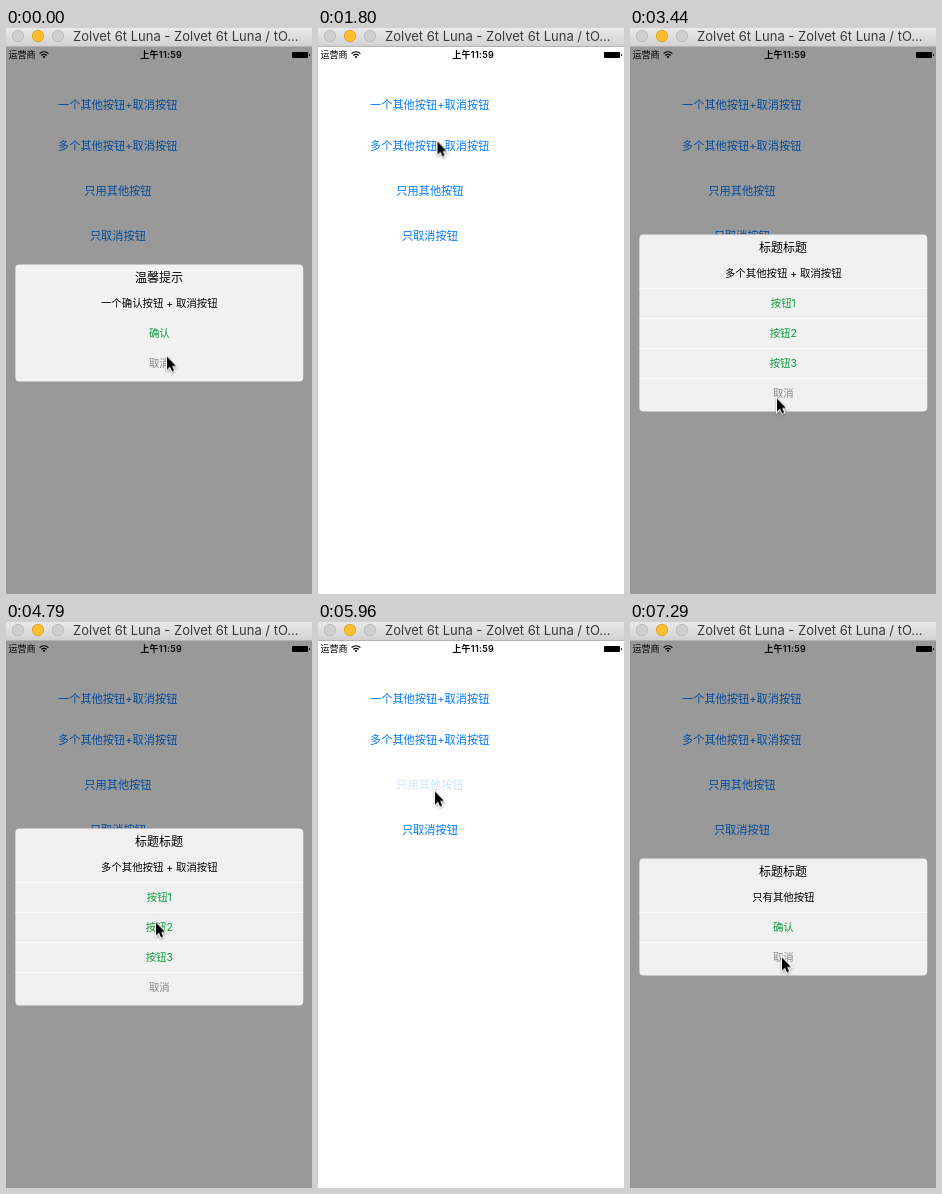
Recreate the animation shown at these times as an HTML page. Size 306x566 px, loop 8000 ms.

```html
<!DOCTYPE html>
<html lang="zh-CN">
<head>
<meta charset="utf-8">
<title>Alert demo</title>
<style>
html, body { margin: 0; width: 100%; height: 100%; overflow: hidden; background: #fff; }
svg { display: block; width: 306px; height: 566px; }
text { font-family: Inter, "Noto Sans CJK SC", "Noto Sans CJK", "Noto Sans CJK JP", sans-serif; text-anchor: middle; }

.window { font-size: 13px; fill: #3a3a3a; text-anchor: start; }
.carrier { font-size: 9px; text-anchor: start; }
.clock { font-size: 9px; font-weight: 600; letter-spacing: .3px; }
.link { font-size: 11.2px; fill: #007aff; }
.head { font-size: 12px; }
.dialog { font-size: 10.4px; }
.box { fill: #f0f0f0; }
.ok { fill: #0f9a40; }
.no { fill: #888; }
.lines { stroke: #fbfbfb; }

/* one 8 s cycle; every state change is a hard cut */
.cut { animation: 8s step-end infinite; }
.dim { animation-name: dim; }
.first { animation-name: first; }
.second { animation-name: second; }
.third { animation-name: third; }
.second .lines { animation-name: lines2; }
.third .lines { animation-name: lines3; }
.press2 { animation-name: press2; }
.press3 { animation-name: press3; }
@keyframes dim {
  0%, 29.99%, 76.37%, 100% { opacity: 1; }
  9.37%, 63.62% { opacity: 0; }
}
@keyframes first { 0% { opacity: 1; } 9.37%, 100% { opacity: 0; } }
@keyframes second {
  0%, 63.62%, 100% { opacity: 0; }
  29.99% { opacity: .57; }
  31.87% { opacity: 1; }
}
@keyframes third {
  0% { opacity: 0; }
  76.37% { opacity: .57; }
  78.24%, 100% { opacity: 1; }
}
@keyframes lines2 { 0% { opacity: 0; } 31.87%, 100% { opacity: 1; } }
@keyframes lines3 { 0% { opacity: 0; } 78.24%, 100% { opacity: 1; } }
@keyframes press2 { 0%, 31.87%, 100% { opacity: 1; } 29.99% { opacity: .65; } }
@keyframes press3 {
  0%, 78.24%, 100% { opacity: 1; }
  74.49% { opacity: .2; }
  76.37% { opacity: .65; }
}

/* the pointer advances about every 150 ms */
.pointer { animation: roam 8s step-end infinite; filter: drop-shadow(0 1px 1px rgba(0, 0, 0, .35)); }
@keyframes roam {
  0% { transform: translate(161px, 328.5px); }
  13.08% { transform: translate(161px, 328.5px); animation-timing-function: steps(4, start); }
  20.58% { transform: translate(118px, 104px); animation-timing-function: steps(2, start); }
  24.33%, 33% { transform: translate(119.5px, 113.5px); }
  33.7% { transform: translate(119.5px, 113.5px); animation-timing-function: steps(2, start); }
  37.45% { transform: translate(146px, 317px); }
  39.3% { transform: translate(146px, 317px); animation-timing-function: steps(3, start); }
  44.74% { transform: translate(147px, 370.5px); }
  48.58% { transform: translate(147px, 370.5px); animation-timing-function: steps(5, start); }
  57.95% { transform: translate(154px, 292px); animation-timing-function: steps(2, start); }
  61.7% { transform: translate(150px, 300.5px); }
  65.45% { transform: translate(150px, 300.5px); animation-timing-function: steps(5, start); }
  74.82% { transform: translate(117px, 169.5px); }
  80.08% { transform: translate(117px, 169.5px); animation-timing-function: steps(4, start); }
  87.41% { transform: translate(150px, 325px); animation-timing-function: steps(3, start); }
  92.9%, 100% { transform: translate(152px, 335.5px); }
}
</style>
</head>
<body>
<svg viewBox="0 0 306 566">
  <defs>
    <linearGradient id="bar" x2="0" y2="1">
      <stop stop-color="#e9e9e9"/>
      <stop offset="1" stop-color="#d2d2d2"/>
    </linearGradient>
  </defs>

  <rect width="306" height="566" fill="#fff"/>
  <text class="link" x="111.7" y="81.2">一个其他按钮+取消按钮</text>
  <text class="link cut press2" x="111.7" y="122.2">多个其他按钮+取消按钮</text>
  <text class="link cut press3" x="111.9" y="166.6">只用其他按钮</text>
  <text class="link" x="111.9" y="212.4">只取消按钮</text>
  <rect class="cut dim" y="19" width="306" height="547" fill-opacity=".4"/>

  <text class="carrier" x="2.5" y="30.3">运营商</text>
  <g fill="none" stroke="#000" stroke-width="1.2">
    <path d="M33.6 25.6a6.2 6.2 0 0 1 8.8 0M35.3 27.5a3.8 3.8 0 0 1 5.4 0"/>
  </g>
  <path d="M36.6 28.7a2 2 0 0 1 2.8 0L38 30.2z"/>
  <text class="clock" x="155.2" y="30.2">上午11:59</text>
  <rect x="286" y="24" width="16" height="6" rx="1"/>
  <rect x="303" y="26" width="1" height="2" rx=".5"/>

  <g class="dialog cut first">
    <rect class="box" x="9.4" y="236.5" width="287.8" height="117" rx="4" style="fill:#f2f2f2"/>
    <text class="head" x="153" y="254.3">温馨提示</text>
    <text x="153.3" y="278.8">一个确认按钮 + 取消按钮</text>
    <text class="ok" x="153.3" y="308.8">确认</text>
    <text class="no" x="153.3" y="338.8">取消</text>
  </g>

  <g class="dialog cut second">
    <rect class="box" x="9.4" y="206.5" width="287.8" height="177" rx="4"/>
    <path class="lines cut" d="M9.4 260.5h287.8m-287.8 30h287.8m-287.8 30h287.8m-287.8 30h287.8"/>
    <text class="head" x="153" y="224.3">标题标题</text>
    <text x="153.3" y="248.8">多个其他按钮 + 取消按钮</text>
    <text class="ok" x="153.3" y="278.8">按钮1</text>
    <text class="ok" x="153.3" y="308.8">按钮2</text>
    <text class="ok" x="153.3" y="338.8">按钮3</text>
    <text class="no" x="153.3" y="368.8">取消</text>
  </g>

  <g class="dialog cut third">
    <rect class="box" x="9.4" y="236.5" width="287.8" height="117" rx="4"/>
    <path class="lines cut" d="M9.4 290.5h287.8m-287.8 30h287.8"/>
    <text class="head" x="153" y="254.3">标题标题</text>
    <text x="153.3" y="278.8">只有其他按钮</text>
    <text class="ok" x="153.3" y="308.8">确认</text>
    <text class="no" x="153.3" y="338.8">取消</text>
  </g>

  <rect width="306" height="18" fill="url(#bar)"/>
  <rect y="18" width="306" height="1" fill="#b4b4b4"/>
  <g fill="#d0d0d0" stroke="#bcbcbc">
    <circle cx="12" cy="8" r="5.7"/>
    <circle cx="32" cy="8" r="5.7" fill="#fdbe2f" stroke="#e3a429"/>
    <circle cx="52" cy="8" r="5.7"/>
  </g>
  <text class="window" x="67" y="13">Zolvet 6t Luna - Zolvet 6t Luna / tO...</text>

  <g class="pointer">
    <path d="M0 0V13L3 10.3L5.1 15L7.1 14.1L5.1 9.6H9Z" stroke="#fff" stroke-width="2" paint-order="stroke"/>
  </g>
</svg>
</body>
</html>
```
